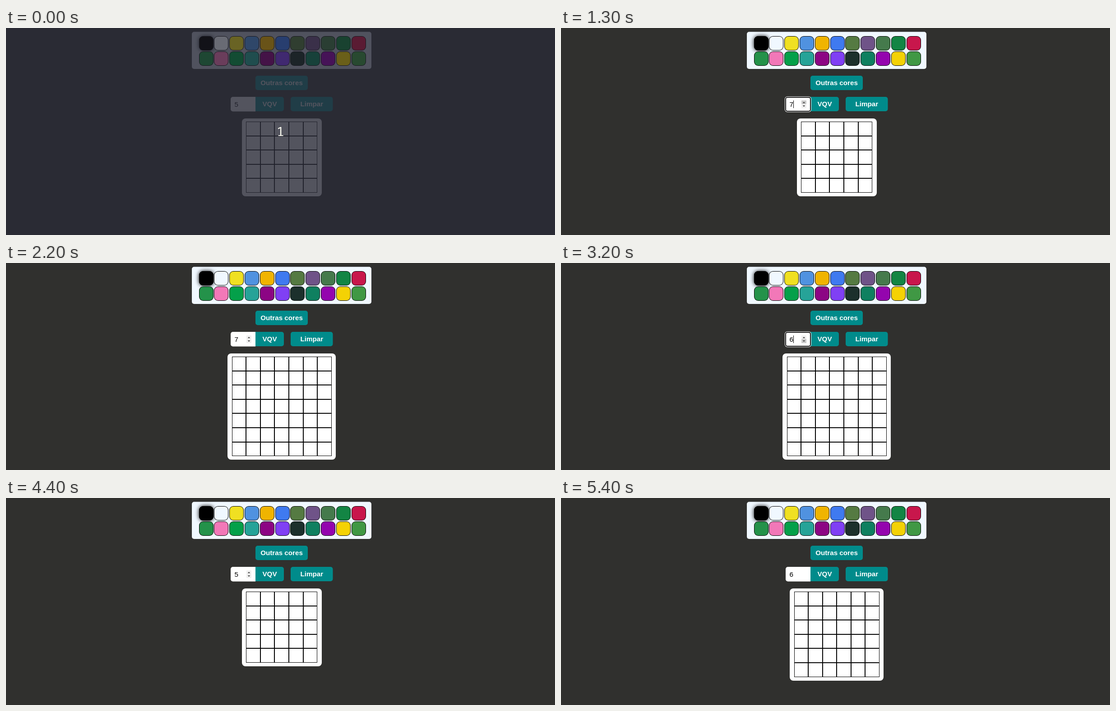
An HTML page with a canvas that plays this animation: 1217x460 px, repeating every 6400 ms.

```html
<!DOCTYPE html>
<html lang="pt">
<head>
<meta charset="utf-8">
<title>Pixel grid</title>
<style>
html, body { margin: 0; width: 100%; height: 100%; overflow: hidden; background: #30302e; }
canvas { display: block; }
</style>
</head>
<body>
<canvas id="stage" width="1217" height="460"></canvas>
<script>
const ctx = document.getElementById('stage').getContext('2d');
const LOOP = 6400;
const CELL = 31.56;
const CENTER = 611.2;
const TEAL = '#008b8b';
const SANS = '"Liberation Sans", Arial, sans-serif';
const COLORS = [
  '#000000 #f0f8ff #f0e022 #5092e0 #f0b400 #3f7af0 #557a42 #6f5388 #457a4c #138544 #c8174c',
  '#24924a #f278b8 #04a04a #26a398 #8c0584 #8040f4 #1c302c #0f8060 #9405ae #f4d204 #409844'
].map(row => row.split(' '));

// Each step changes part of the state: spin is the spinner, hot its half, hover the VQV button.
const START = { veil: true, value: 5, size: 5, spin: false, hot: '', down: false, focus: false, hover: false };
const STEPS = [
  [100, { veil: false }],
  [600, { spin: true }],
  [700, { hot: 'low' }],
  [800, { hot: 'up' }],
  [1000, { focus: true, value: 6, down: true }],
  [1100, { down: false }],
  [1200, { value: 7, down: true }],
  [1300, { down: false }],
  [1400, { spin: false, hot: '', hover: true }],
  [1700, { focus: false }],
  [1800, { size: 7 }],
  [2000, { hover: false }],
  [2200, { spin: true }],
  [2700, { hot: 'low' }],
  [3100, { focus: true, value: 6, down: true }],
  [3200, { down: false }],
  [3300, { value: 5, down: true }],
  [3400, { down: false }],
  [3700, { spin: false, hot: '', hover: true }],
  [3800, { focus: false }],
  [4000, { size: 5 }],
  [4400, { hover: false, spin: true }],
  [4600, { hot: 'up' }],
  [4800, { focus: true, value: 6, down: true }],
  [4900, { down: false }],
  [5000, { spin: false, hot: '', hover: true }],
  [5100, { focus: false, size: 6 }],
  [5400, { hover: false }]
];

function stateAt(t) {
  const state = { ...START };
  for (const [time, change] of STEPS) if (t >= time) Object.assign(state, change);
  return state;
}

function box(x, y, w, h, r, fill) {
  ctx.beginPath();
  ctx.roundRect(x, y, w, h, r);
  ctx.fillStyle = fill;
  ctx.fill();
}

function glow(color, blur, offset, draw) {
  ctx.save();
  ctx.shadowColor = color;
  ctx.shadowBlur = blur;
  ctx.shadowOffsetX = ctx.shadowOffsetY = offset;
  draw();
  ctx.restore();
}

function text(str, x, y, font, fill, align) {
  ctx.font = font;
  ctx.fillStyle = fill;
  ctx.textAlign = align;
  ctx.fillText(str, x, y);
}

function button(label, x, y, w, r, fill) {
  box(x, y, w, 32, r, fill);
  text(label, x + w / 2, y + 20.5, 'bold 15.2px ' + SANS, '#fff', 'center');
}

function swatches() {
  COLORS.forEach((row, j) => row.forEach((color, i) => {
    const x = Math.round(427.5 + i * 33.8), y = 18 + j * 34;
    box(x, y, 32, 32, 9, '#000');
    box(x + 1, y + 1, 30, 30, 8, color);
  }));
}

function palette() {
  box(412, 8.5, 398, 82.5, 5, '#f0f8ff');
  glow('#000', 10, 0, () => box(428, 18, 32, 32, 9, '#000'));
  swatches();
}

function arrow(y, dir) {
  ctx.beginPath();
  ctx.moveTo(535.8, y);
  ctx.lineTo(541.2, y);
  ctx.lineTo(538.5, y + 3 * dir);
  ctx.fillStyle = '#404040';
  ctx.fill();
}

function spinner(s) {
  box(533, 161, 11, 17, 0, '#efefef');
  const shade = s.down ? '#bcbcbc' : '#cbcbcb';
  if (s.hot === 'up') box(533, 161, 11, 8, 0, shade);
  if (s.hot === 'low') box(533, 169, 11, 9, 0, shade);
  arrow(167, -1);
  arrow(172, 1);
}

function controls(s) {
  button('Outras cores', 553, 106, 116, 5, TEAL);
  const send = () => box(553, 153, 63, 32, [0, 5, 5, 0], '#00c8c8');
  if (s.hover) glow('#fff', 8, 2, send);
  button('VQV', 553, 153, 63, [0, 5, 5, 0], s.hover ? '#00c8c8' : TEAL);
  button('Limpar', 631, 153, 93.5, 5, TEAL);

  if (s.focus) {
    box(496, 152, 59, 35, 6, '#fff');
    box(497, 153, 57, 33, 5, '#101010');
    box(499, 155, 53, 29, 3, '#fff');
  } else {
    box(498, 153, 55, 32.5, [5, 0, 0, 5], '#fff');
  }
  text(s.value, 506.5, 175, '15.2px ' + SANS, '#000', 'left');
  if (s.focus && s.spin) box(515, 161, 1, 17, 0, '#000');
  if (s.spin) spinner(s);
}

function board(n) {
  const side = n * CELL;
  const left = CENTER - side / 2, top = 208.2;
  box(Math.round(left - 9.4), 201, Math.round(side + 19), Math.round(side + 15.2), 8, '#fff');
  const edge = (from, i) => Math.round(from + i * CELL);
  ctx.strokeStyle = '#000';
  ctx.lineWidth = 1;
  for (let j = 0; j < n; j++) {
    for (let i = 0; i < n; i++) {
      const x = edge(left, i), y = edge(top, j);
      ctx.strokeRect(x + 0.5, y + 0.5, edge(left, i + 1) - x - 1, edge(top, j + 1) - y - 1);
    }
  }
}

function veil() {
  box(0, 0, 1217, 460, 0, 'rgba(40, 42, 54, 0.8)');
  ctx.globalAlpha = 0.25;
  swatches();
  ctx.globalAlpha = 1;
  text('1', 608.5, 240, '28px "Noto Sans Mono", monospace', '#fffff4', 'center');
}

function frame(now) {
  const s = stateAt(now % LOOP);
  box(0, 0, 1217, 460, 0, '#30302e');
  palette();
  controls(s);
  board(s.size);
  if (s.veil) veil();
  requestAnimationFrame(frame);
}
requestAnimationFrame(frame);
</script>
</body>
</html>
```
